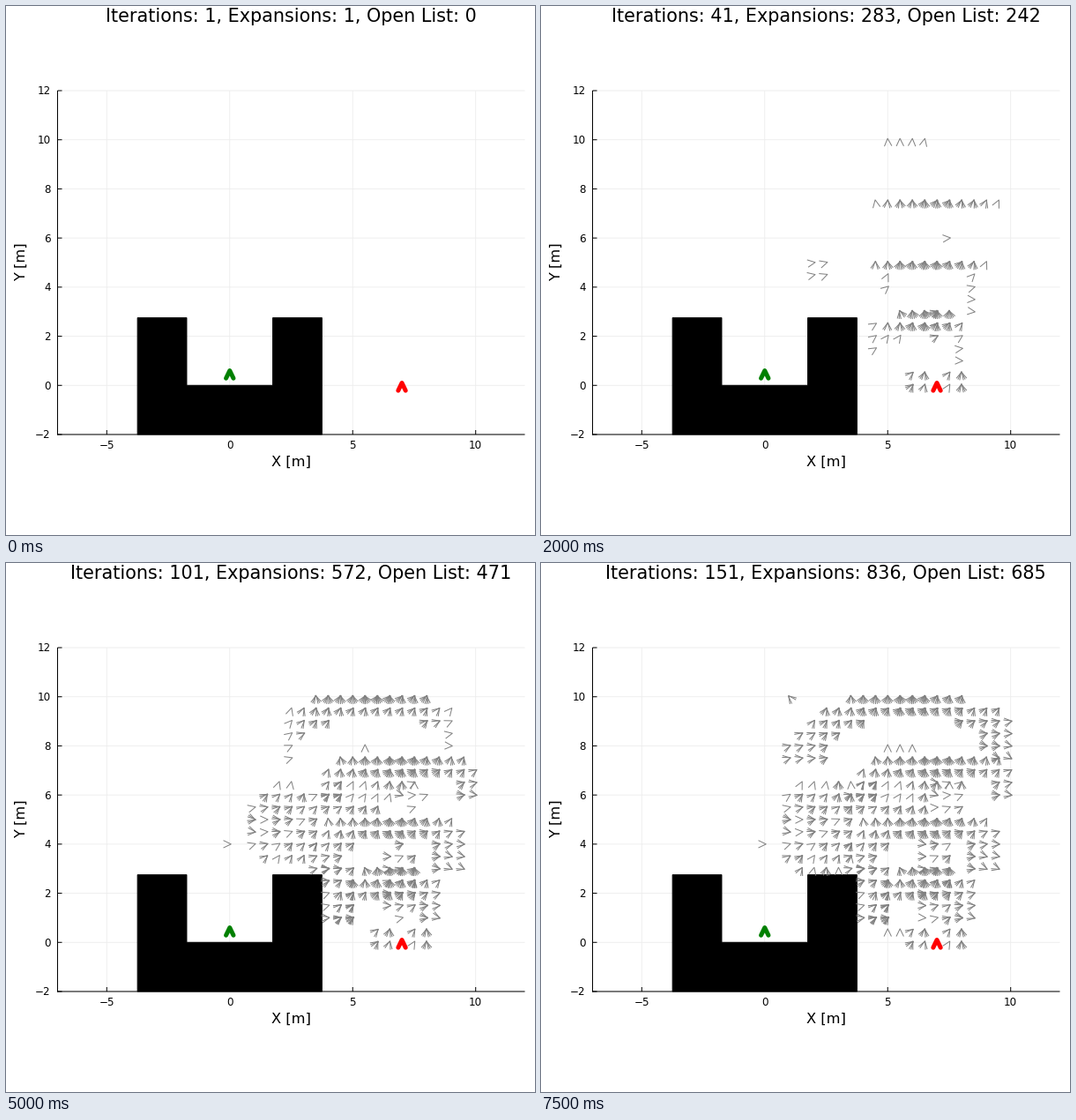
Recreate the animation shown at these times as a matplotlib script. Size 600 by 600 pixels, loop 8 s.

```python
import numpy as np
import matplotlib.pyplot as plt
from matplotlib.animation import FuncAnimation
from matplotlib.collections import LineCollection
from matplotlib.patches import Polygon

DPI = 100
PX = 72 / DPI
FRAMES = 16
LEFT, RIGHT, TOP, BOTTOM = 58.5, 588.5, 96, 486
UNIT_X, UNIT_Y = (RIGHT - LEFT) / 19, (BOTTOM - TOP) / 14

plt.rcParams["font.family"] = "DejaVu Sans"
plt.rcParams["path.snap"] = False
fig = plt.figure(figsize=(6, 6), dpi=DPI, facecolor="white")
ax = fig.add_axes([0, 0, 1, 1])
ax.set(xlim=(0, 600), ylim=(600, 0))
ax.axis("off")
rng = np.random.default_rng(4)


def to_px(x, y):
    return LEFT + (x + 7) * UNIT_X, BOTTOM - (y + 2) * UNIT_Y


def line(xs, ys, color="black", width=1.0, z=2):
    ax.plot(xs, ys, color=color, lw=width * PX, zorder=z,
            solid_capstyle="butt")


def label(x, y, text, size, **kw):
    kw = {"ha": "center", "va": "baseline", **kw}
    return ax.text(x, y, text, fontsize=size * PX, zorder=6, **kw)


def chevron(x, y, heading, lead=1.5):
    """Open arrow head at a state, as pixel points; lead shifts it forward."""
    px, py = to_px(x, y)
    c, s = np.cos(np.radians(heading)), np.sin(np.radians(heading))
    shape = [(lead - 8.7, 4.2), (lead, 0), (lead - 8.7, -4.2)]
    return [(px + u * c - v * s, py - u * s - v * c) for u, v in shape]


def marker(x, y, color):
    xs, ys = zip(*chevron(x, y, 90, lead=2.8))
    ax.plot(xs, ys, color=color, lw=5 * PX, zorder=5,
            solid_capstyle="round", solid_joinstyle="round")


# Explored states: (birth step, chevron)
states = []


def fan(x, y, heading, count, birth):
    """Headings 15 degrees apart, opening outwards from the middle one."""
    for k in range(count):
        turn = 15 * ((k + 1) // 2) * (-1) ** k
        states.append((birth + 0.8 * k, chevron(x, y, heading + turn)))


def cells(cx, cy, rx, ry, power, inner, outer):
    """Half-metre grid points in a superelliptic ring, with local coordinates."""
    for x in np.arange(0, 10.1, 0.5):
        for y in np.arange(0, 10.1, 0.5):
            u, v = (x - cx) / rx, (y - cy) / ry
            if inner <= abs(u) ** power + abs(v) ** power <= outer:
                yield x, y, u, v


def dome(cx, cy, rx, ry, start, pace, inner, outer, floor, power=4):
    """Arched front: crown faces up, shoulders turn right, inside fills late."""
    for x, y, u, v in cells(cx, cy, rx, ry, power, inner, outer):
        if y < floor:
            continue
        heading = 90 * max(v, 0) ** 1.5 - 20 * u + rng.uniform(-6, 6)
        centre = max(0, 1 - abs(u))
        birth = start + pace * u * u + 5 * centre * (v < 0.85)
        fan(x, y, heading, 2 + round(3 * centre), birth)


def blob(cx, cy, rx, ry, start, pace, inside, edge, most=3):
    """Patch growing from its centre, heading blends from inside to edge."""
    for x, y, u, v in cells(cx, cy, rx, ry, 4, 0, 1.15):
        heading = inside + (edge - inside) * abs(v) + 25 * u * (most > 1)
        birth = start + pace * (u * u + v * v)
        fan(x, y, heading, rng.integers(1, most + 1), birth)


# One arched front per 2.5 m motion step
dome(6.6, 0.5, 2.0, 2.3, 1, 4, 0.17, 1.5, floor=1)
dome(6.65, 3.0, 2.8, 2.1, 1, 4, 0.17, 1.75, floor=3)
dome(7.0, 5.0, 3.2, 2.6, 2, 3, 0.33, 1.25, floor=6)
dome(5.9, 7.5, 4.6, 2.6, 4, 9, 0.48, 1.22, floor=7.5, power=2)

blob(6.25, 0.25, 0.4, 0.4, 1, 0, 65, 65)        # reversing from the start
blob(7.75, 0.25, 0.4, 0.4, 1, 2, 75, 75)
blob(5.25, 0.5, 0.4, 0.2, 12, 0, 90, 90, most=1)
blob(7.0, 2.5, 0.7, 1.7, 2, 8, 45, 10)          # stem
blob(4.6, 2.0, 0.8, 1.1, 3, 4, 40, 30)          # beside the wall
blob(2.3, 4.8, 1.6, 1.8, 4, 7, 5, 80)           # above the wall
blob(5.0, 5.8, 1.6, 0.6, 4, 6, 45, 55)          # between the fronts
blob(7.5, 6.0, 0.7, 0.6, 4, 6, 5, 25, most=2)
blob(6.0, 6.5, 2.2, 0.3, 8, 4, 75, 75)
blob(5.5, 8.0, 0.7, 0.2, 7, 8, 90, 90, most=1)
fan(0, 4, 0, 1, 8)
fan(1, 10, 140, 2, 12)

# Plot frame, grid and ticks
for n in (-5, 0, 5, 10):
    x, _ = to_px(n, 0)
    line([x, x], [TOP, BOTTOM], "#ededed", 0.9, 1)
    line([x, x], [BOTTOM, BOTTOM - 5], z=4)
    label(x, 502, str(n).replace("-", "\u2212"), 11.9)
for n in range(-2, 13, 2):
    _, y = to_px(0, n)
    line([LEFT, RIGHT], [y, y], "#ededed", 0.9, 1)
    line([LEFT, LEFT + 5], [y, y], z=4)
    label(50.5, y + 4.4, str(n).replace("-", "\u2212"), 11.9, ha="right")
line([LEFT, LEFT], [TOP, BOTTOM + 0.5], z=4)
line([LEFT - 0.5, RIGHT], [BOTTOM, BOTTOM], z=4)
label(323.5, 522, "X [m]", 16.3)
label(17.6, 290.5, "Y [m]", 16.3, rotation=90, va="center")

walls = [(-3.75, -2), (-3.75, 2.75), (-1.75, 2.75), (-1.75, 0),
         (1.75, 0), (1.75, 2.75), (3.75, 2.75), (3.75, -2)]
ax.add_patch(Polygon([to_px(*p) for p in walls], fc="black", ec="black",
                     lw=PX, zorder=2))

arrows = LineCollection([], colors="gray", linewidths=PX, zorder=3)
ax.add_collection(arrows, autolim=False)
marker(0, 0.5, "green")
marker(7, 0, "red")
title = label(323, 18, "", 20.8)


def expansions(step):
    return round(np.interp(step, [0, 1, 2, 4, 8, 10, 13, 15],
                           [1, 89, 162, 283, 466, 572, 738, 836]))


def update(i):
    its, exp = 10 * i + 1, expansions(i)
    title.set_text(f"Iterations: {its}, Expansions: {exp}, "
                   f"Open List: {exp - its}")
    arrows.set_segments([c for born, c in states if i and born <= i + 0.5])
    return arrows, title


anim = FuncAnimation(fig, update, frames=FRAMES, interval=500,
                     repeat=True, repeat_delay=0)
plt.show()
```
